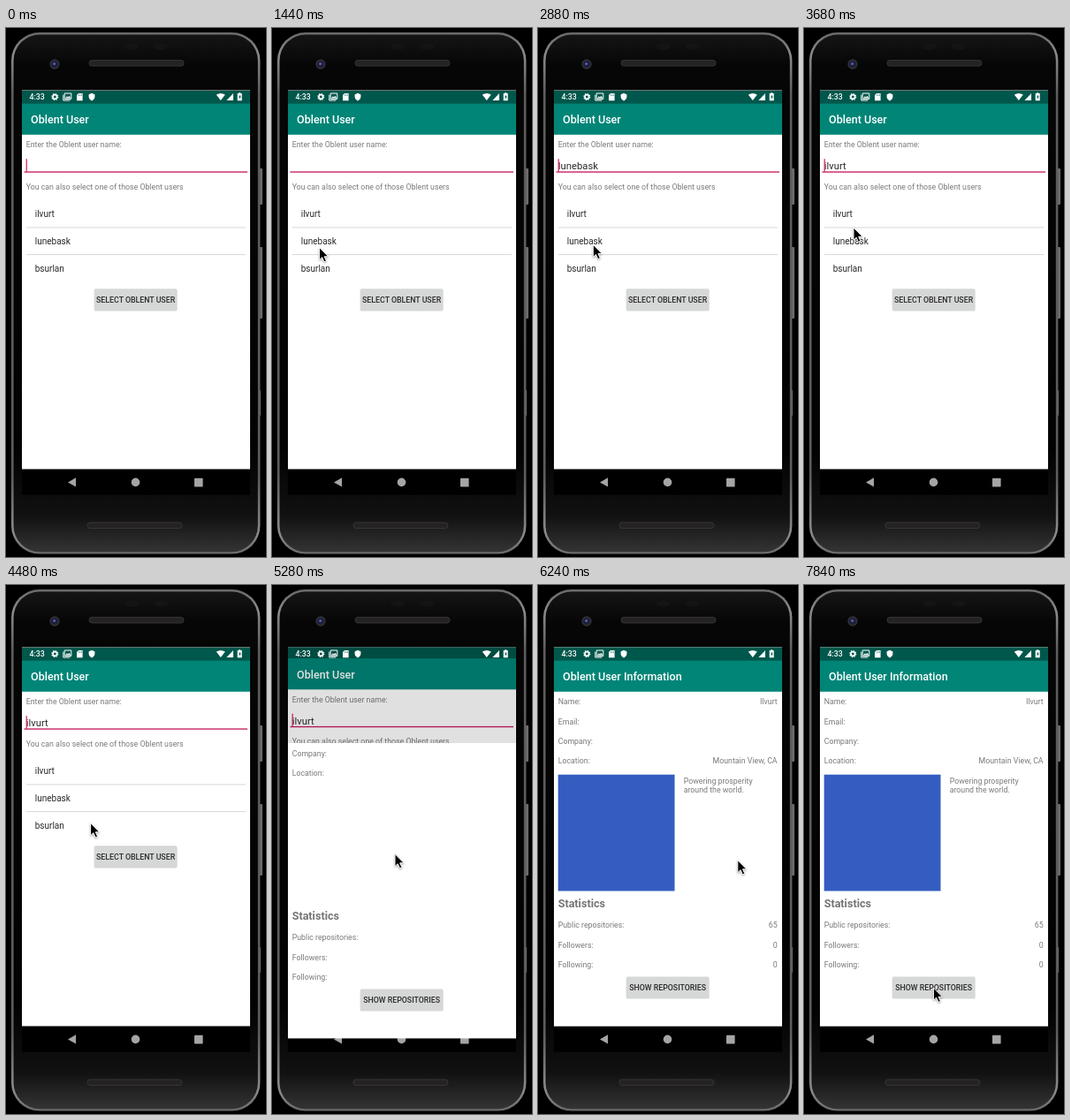
These frames come from a looping animation (294 px wide and 599 px high, 8000 ms). An HTML page:

```html
<!DOCTYPE html>
<html lang="en">
<head>
<meta charset="utf-8">
<title>User lookup</title>
<style>
  html, body { margin: 0; width: 100%; height: 100%; overflow: hidden; background: #000; }
  svg { display: block; width: 294px; height: 599px; }
  text { font-family: Roboto, "Noto Sans", sans-serif; white-space: pre; }
  .label { font-size: 8.79px; fill: #7a7a7a; }
  .item { font-size: 10.04px; fill: #2a2a2a; }
  .input { font-size: 11.3px; fill: #2a2a2a; }
  .title { font-size: 12.55px; font-weight: 500; fill: #fff; }
  .head { font-size: 12.55px; font-weight: 700; fill: #757575; }
  .btn { font-size: 8.79px; font-weight: 500; fill: #2a2a2a; text-anchor: middle; }
  .clock { font-size: 8.79px; font-weight: 500; fill: #fff; }
  .end { text-anchor: end; }
  #pointer { filter: drop-shadow(0 1px .8px rgba(0, 0, 0, .35)); }
</style>
</head>
<body>
<svg viewBox="0 0 294 599">
  <defs>
    <linearGradient id="rim" x2="0" y2="1">
      <stop offset="0" stop-color="#6a6869"/>
      <stop offset=".04" stop-color="#8c8a8b"/>
      <stop offset=".12" stop-color="#5e5c5d"/>
      <stop offset=".85" stop-color="#5e5c5d"/>
      <stop offset=".96" stop-color="#8c8a8b"/>
      <stop offset="1" stop-color="#6a6869"/>
    </linearGradient>
    <linearGradient id="body" x2="0" y2="1">
      <stop offset="0" stop-color="#161516"/>
      <stop offset=".06" stop-color="#060606"/>
      <stop offset=".8" stop-color="#020202"/>
      <stop offset=".93" stop-color="#111"/>
      <stop offset="1" stop-color="#353435"/>
    </linearGradient>
    <clipPath id="screen"><rect x="18" y="70.6" width="258" height="428.8"/></clipPath>
    <clipPath id="reveal"><rect id="window" x="18" y="71" width="258" height="458"/></clipPath>
  </defs>

  <g id="phone">
    <rect width="294" height="599"/>
    <g fill="#6c6a6b">
      <rect x="286" y="159" width="4" height="41" rx="1"/>
      <rect x="286" y="248" width="4" height="81" rx="1"/>
      <rect x="286" y="410" width="2" height="29" rx="1"/>
    </g>
    <rect x="6" y="5" width="281.4" height="590.6" rx="32" fill="url(#rim)"/>
    <rect x="8.6" y="7.4" width="276.2" height="585.8" rx="29.5" fill="url(#body)"/>
    <ellipse cx="142" cy="21" rx="8" ry="3.5" fill="#151415"/>
    <ellipse cx="175" cy="21" rx="8" ry="3.5" fill="#151415"/>
    <rect x="94" y="36.5" width="107" height="6.5" rx="3" fill="#242223" stroke="#3c3a3b" stroke-width=".8"/>
    <rect x="92" y="560" width="107" height="6.5" rx="3" fill="#242223" stroke="#3c3a3b" stroke-width=".8"/>
    <circle cx="55" cy="41" r="5.7" fill="#302f36"/>
    <circle cx="55" cy="41" r="3.8" fill="#1d1e3c"/>
    <circle cx="54.6" cy="40.6" r="1.5" fill="#5560a8"/>
  </g>

  <rect x="18" y="70.6" width="258" height="458"/>
  <g fill="#a5a5a5">
    <path d="M70 514.4 79 509.2v10.4z"/>
    <circle cx="146.5" cy="514.4" r="4.8"/>
    <rect x="213" y="509.8" width="9.6" height="9.6" rx=".6"/>
  </g>

  <g clip-path="url(#screen)">
    <rect x="18" y="70" width="258" height="430" fill="#fff"/>
    <g id="picker"></g>
    <rect id="shade" x="18" y="70" width="258" height="430" opacity="0"/>
  </g>
  <g clip-path="url(#reveal)"><g id="info"></g></g>

  <g fill="#fff">
    <text class="clock" x="26.5" y="81.3">4:33</text>
    <circle cx="55.3" cy="78" r="2.3" fill="none" stroke="#fff" stroke-width="1.7"/>
    <circle cx="55.3" cy="78" r="3.5" fill="none" stroke="#fff" stroke-width="1.1" stroke-dasharray="1.4 1.35"/>
    <path d="M66.2 74h7.6v6.4h-7.6zM64.8 75.6v6.4h7.5" fill="none" stroke="#fff" stroke-width="1"/>
    <path d="m67 79.6 1.8-2.4 1.3 1.4 1.3-1.8 2 2.8z"/>
    <path d="M82 74h4.6v8.2h-6.6V76z"/>
    <path d="M82.4 75.2v1.6M84 75.2v1.6M85.4 75.2v1.6" stroke="#00574b" stroke-width=".6"/>
    <path d="m97 73.8 3.4 1.4v2.6c0 2.2-1.4 3.8-3.4 4.6-2-.8-3.4-2.4-3.4-4.6v-2.6z"/>
    <path d="M237.8 75.6q5-3.2 10 0l-5 6.4z"/>
    <path d="M257 74v8h-7.6z"/>
    <path d="M263.2 74v-.8h2v.8h1.5v8.2h-5V74z"/>
    <path d="m264.7 75.6-1.7 2.8h1.1v2.2l1.7-3h-1.1z" fill="#00574b"/>
  </g>

  <path id="pointer" d="M0 0v14.2l3.2-3 2.3 5.2 2.5-1.1-2.3-5h4.5z" stroke="#fff" stroke-width="1" stroke-linejoin="round"/>
</svg>
<script>
const LOOP = 8000, STEP = 160;
const SITE = "Oblent", PICK = "ilvurt", FIRST = "lunebask", THIRD = "bsurlan";
const $ = id => document.getElementById(id);

const text = (cls, x, y, s, id = "") => `<text class="${cls}" x="${x}" y="${y}" id="${id}">${s}</text>`;
const rect = (x, y, w, h, fill, more = "") =>
  `<rect x="${x}" y="${y}" width="${w}" height="${h}" fill="${fill}" ${more}/>`;
const button = (y, s) =>
  rect(99.6, y + .8, 94, 24.4, "#000", 'rx="1.6" opacity=".16"') +
  rect(100, y, 93.2, 24.2, "#d6d7d7", 'rx="1.3"') +
  text("btn", 146.6, y + 15.4, s);
const bars = title =>
  rect(18, 70.6, 258, 16, "#00574b") + rect(18, 85.6, 258, 35.2, "#008577") +
  text("title", 28, 108, title);

$("picker").innerHTML = bars(SITE + " User") +
  text("label", 22.7, 135.2, `Enter the ${SITE} user name:`) +
  text("input", 22.7, 160, "", "entry") +
  rect(20.5, 162.4, 252.5, 1.3, "#c2185b") +
  rect(22.6, 148.2, 1.2, 14.6, "#d81b60", 'id="caret"') +
  text("label", 22.7, 182.9, `You can also select one of those ${SITE} users`) +
  [PICK, FIRST, THIRD].map((s, i) => text("item", 32.7, 214.3 + 30.9 * i, s)).join("") +
  [225.5, 256.2].map(y => rect(23, y, 248, .9, "#d2d2d2")).join("") +
  button(295.2, `SELECT ${SITE.toUpperCase()} USER`);

const rows = [
  ["Name:", "Ilvurt", 135.4], ["Email:", "", 157.7], ["Company:", "", 180],
  ["Location:", "Mountain View, CA", 202.2], ["Public repositories:", "65", 388.2],
  ["Followers:", "0", 410.5], ["Following:", "0", 432.8]
];
$("info").innerHTML = rect(18, 70.6, 258, 428.8, "#fff") + bars(SITE + " User Information") +
  rows.map(r => text("label", 22.7, r[2], r[0])).join("") +
  text("head", 22.7, 365, "Statistics") + button(443.4, "SHOW REPOSITORIES") +
  '<g id="data">' + rows.map(r => text("label end", 270.6, r[2], r[1])).join("") +
  rect(22.7, 214.7, 131.8, 131.8, "#355dc1") +
  text("label", 164.7, 224.8, "Powering prosperity") +
  text("label", 164.7, 235, "around the world.") + "</g>";

// time, x, y
const path = [
  [960, 212, 402], [1120, 150, 338], [1280, 82, 272], [1440, 53.5, 248.5], [1920, 62, 256],
  [2080, 64, 261], [2400, 62, 246], [2880, 62.3, 245.3], [3040, 58, 228], [3360, 50, 212],
  [3680, 56, 226], [4000, 88, 262], [4160, 95.6, 269.5], [4480, 95.6, 269.5],
  [4960, 139, 304.5], [5760, 139, 304.5], [6240, 225.8, 311.5], [6560, 225.8, 311.5],
  [7680, 147, 457], [7840, 146.4, 456]
];
// time, lift of the first page, shade, drop of the second page, top of the reveal
const slide = [
  [0, 0, 0, 0, 529], [5280, -2.5, .12, 14, 179], [5440, -4, .15, 1.5, 73], [5600, -4, 0, 0, 70.6]
];
// time, entry text, caret phase start
const entries = [[0, "", -360], [2400, FIRST, 2400], [3360, PICK, 3360]];

const last = (table, t) => table.filter(r => r[0] <= t).pop();
const at = (table, t) => {
  const i = table.findIndex(r => r[0] > t);
  if (i < 0) return table[table.length - 1];
  const a = table[Math.max(i - 1, 0)], b = table[i], k = (t - a[0]) / (b[0] - a[0] || 1);
  return a.map((v, n) => v + (b[n] - v) * k);
};

function draw(now) {
  const t = Math.floor(now % LOOP / STEP) * STEP;
  const [, x, y] = at(path, t);
  $("pointer").setAttribute("transform", `translate(${x} ${y})`);
  $("pointer").setAttribute("visibility", t < path[0][0] ? "hidden" : "visible");

  const [, word, start] = last(entries, t);
  $("entry").textContent = word;
  const blink = Math.floor((Math.min(t, 4800) - start) / 500) % 2;
  $("caret").setAttribute("opacity", blink ? 0 : 1);

  const [, lift, shade, drop, top] = last(slide, t);
  $("picker").setAttribute("transform", `translate(0 ${lift})`);
  $("shade").setAttribute("opacity", shade);
  $("info").setAttribute("transform", `translate(0 ${drop})`);
  $("window").setAttribute("y", top);
  $("window").setAttribute("height", 529 - top);
  $("data").setAttribute("visibility", t < 5600 ? "hidden" : "visible");
}

const begin = performance.now();
function tick() {
  draw(performance.now() - begin);
  requestAnimationFrame(tick);
}
tick();
</script>
</body>
</html>
```
